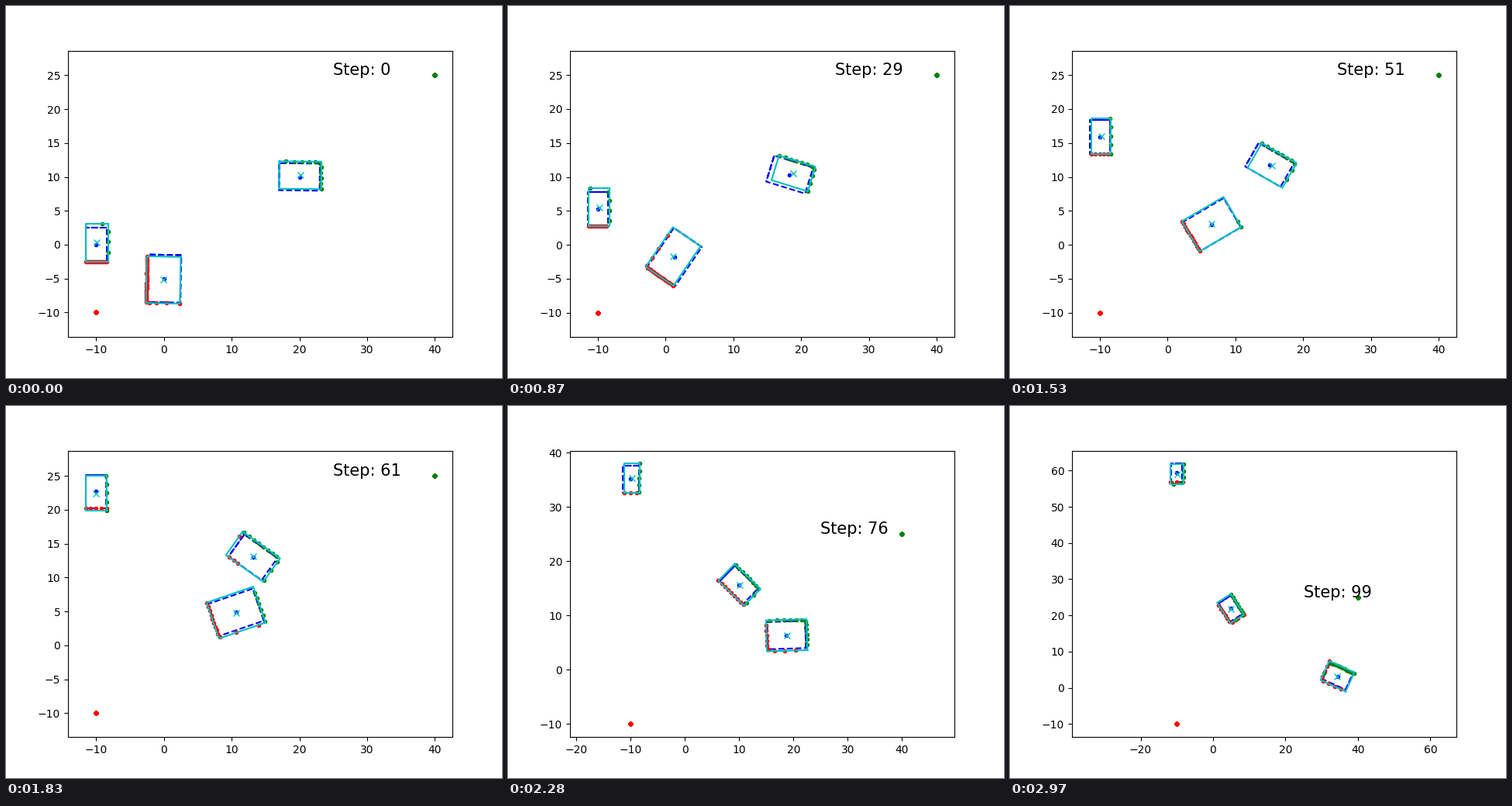
Animation, 640 px wide and 480 px high, one loop 3000 ms. Source, as a matplotlib script:

```python
import numpy as np
import matplotlib.pyplot as plt
from matplotlib.animation import FuncAnimation

STEPS = 100
INTERVAL = 30
DT = 0.2
RES = np.deg2rad(1.5)
RAYS = 240
SEEN = 0.7  # share of a half size at which a side counts as observed


class Vehicle:
    """A box driven with constant acceleration and turn rate."""

    def __init__(self, x, y, yaw, length, width, accel, omega):
        self.half = np.array([length, width]) / 2
        self.poses = []
        yaw, v = np.deg2rad(yaw), 0.0
        for _ in range(STEPS):
            x += v * np.cos(yaw) * DT
            y += v * np.sin(yaw) * DT
            yaw += omega * DT
            v += accel * DT
            self.poses.append((np.array([x, y]), axes_of(yaw)))

    def contour(self, n):
        """Sampled outline; the front edge is traced twice."""
        pos, axes = self.poses[n]
        c = pos + box(-self.half, self.half) @ axes
        t = np.arange(0, 1, 0.01)[:, None]
        path = list(zip(c, c[1:])) + [(c[0], c[1])]
        return np.vstack([(1 - t) * a + t * b for a, b in path])

    def fit(self, n, hits):
        """Box around the hits; a side nobody sees keeps its known place."""
        pos, axes = self.poses[n]
        local = np.vstack([(hits - pos) @ axes.T, np.zeros(2)])
        lo, hi = local.min(axis=0), local.max(axis=0)
        lo = np.where(lo < -SEEN * self.half, lo, -self.half)
        hi = np.where(hi > SEEN * self.half, hi, self.half)
        return pos + (lo + hi) / 2 @ axes, pos + box(lo, hi) @ axes


def axes_of(yaw):
    """Rows: the forward and the right-hand unit vector."""
    c, s = np.cos(yaw), np.sin(yaw)
    return np.array([[c, s], [s, -c]])


def box(lo, hi):
    (x0, y0), (x1, y1) = lo, hi
    return np.array([(x1, y1), (x1, y0), (x0, y0), (x0, y1), (x1, y1)])


def scan(pos, points, owners):
    """Nearest return in each angular bin, and whose it is."""
    d = points - pos
    dist = np.hypot(d[:, 0], d[:, 1])
    bins = np.round(np.arctan2(d[:, 1], d[:, 0]) / RES).astype(int) % RAYS
    order = np.argsort(dist, kind="stable")
    rays, first = np.unique(bins[order], return_index=True)
    near = order[first]
    a = rays * RES
    unit = np.column_stack([np.cos(a), np.sin(a)])
    return pos + dist[near, None] * unit, owners[near]


vehicles = [
    Vehicle(-10, 0, 90, 5, 3, accel=0.3, omega=0.0),
    Vehicle(20, 10, 180, 6, 4, accel=0.1, omega=-0.05),
    Vehicle(0, -5, 90, 7, 5, accel=0.2, omega=-0.1),
]
lidars = [(np.array([-10.0, -10.0]), ".r"), (np.array([40.0, 25.0]), ".g")]

fig, ax = plt.subplots(figsize=(6.4, 4.8), dpi=100)


def draw(n):
    ax.cla()
    outlines = [v.contour(n) for v in vehicles]
    for v, outline in zip(vehicles, outlines):
        ax.plot(*v.poses[n][0], ".b")
        ax.plot(*outline.T, "--b")

    points = np.vstack(outlines)
    owners = np.repeat(np.arange(len(vehicles)), len(outlines[0]))
    scans = [scan(pos, points, owners) for pos, _ in lidars]
    for (pos, style), (hits, _) in zip(lidars, scans):
        # Rays without a return stack up on the sensor
        idle = np.tile(pos, (RAYS - len(hits), 1))
        ax.plot(*np.vstack([hits, idle]).T, style)

    for i, v in enumerate(vehicles):
        own = np.vstack([hits[who == i] for hits, who in scans])
        center, outline = v.fit(n, own)
        ax.plot(*center, "xc")
        ax.plot(*outline.T, "-c")

    ax.text(25, 25, f"Step: {n}", fontsize=15)
    ax.axis("equal")
    return []


anim = FuncAnimation(fig, draw, frames=STEPS, interval=INTERVAL,
                     repeat=True, repeat_delay=0)
plt.show()
```
